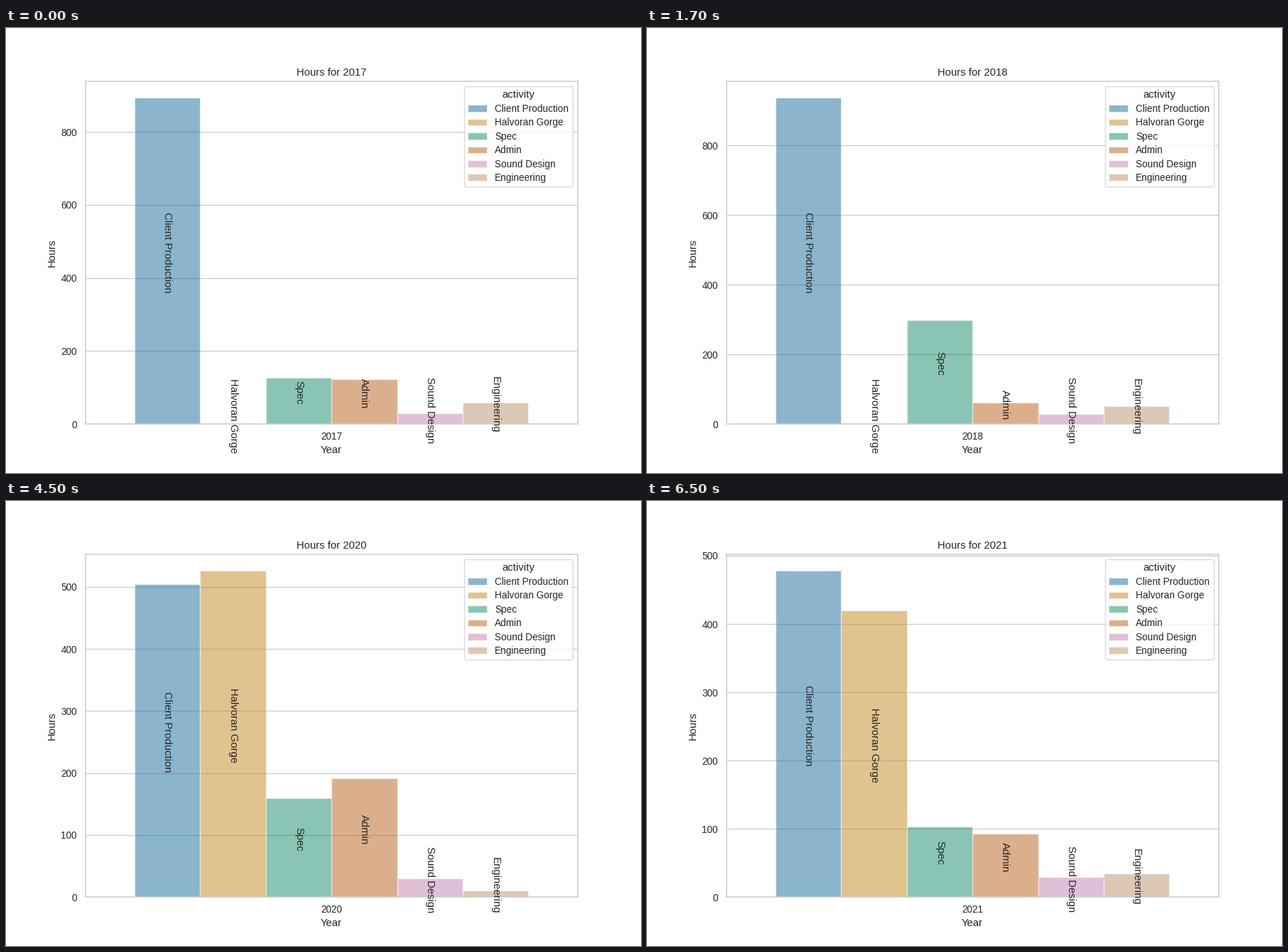
Animation, 894 px wide and 626 px high, one loop 8 s. Source, as a matplotlib script:

```python
import colorsys
import math

import matplotlib.pyplot as plt
from matplotlib.animation import FuncAnimation
from matplotlib.colors import to_rgb

INK, RULE = "0.15", "0.8"
TEXT, SMALL = 14.85, 13.6  # at 72 dpi one point is one pixel
LABEL_LIFT = 12
FIRST_YEAR = 2017


def bell(t, height, centre, width=0.4):
    return height * math.exp(-((t - centre) / width) ** 2 / 2)


# Each activity: colour and hours as a function of years since the first.
ACTIVITIES = {
    "Client Production": ("#0173b2", lambda t: 476.5 + bell(t, 499, 0.6, 1)),
    "Halvoran Gorge": ("#de8f05",
                       lambda t: max(0, bell(t, 640.7, 3.25, 1.161) - 100)),
    "Spec": ("#029e73", lambda t: 101 + bell(t, 216, 0.83) + bell(t, 58, 3)),
    "Admin": ("#d55e00",
              lambda t: 61 + bell(t, 66, -0.15) + bell(t, 143, 3.2, 0.46)),
    "Sound Design": ("#cc78bc", lambda t: 29 + bell(t, 14.5, 2)),
    "Engineering": ("#ca9161", lambda t: 58.5 - bell(t, 48.4, 2.88, 0.95)),
}
BAR_WIDTH = 0.8 / len(ACTIVITIES)

plt.rcParams.update({
    "font.family": "Liberation Sans",
    "font.size": TEXT,
    "axes.titlesize": TEXT,
    "axes.labelsize": TEXT,
    "xtick.labelsize": SMALL,
    "ytick.labelsize": SMALL,
    "legend.fontsize": SMALL,
    "legend.title_fontsize": TEXT,
    "text.color": INK,
    "axes.labelcolor": INK,
    "axes.edgecolor": RULE,
    "axes.linewidth": 1.56,
    "axes.axisbelow": True,
    "axes.titlepad": 8,
    "axes.labelpad": 5,
    "patch.linewidth": 1.25,
})


def muted(color, amount=0.75):
    hue, light, sat = colorsys.rgb_to_hls(*to_rgb(color))
    return colorsys.hls_to_rgb(hue, light, sat * amount)


fig, ax = plt.subplots(figsize=(894 / 72, 626 / 72), dpi=72)
ax.set(xlim=(-0.5, 0.5), xlabel="Year", ylabel="Hours")
ax.grid(axis="y", color=RULE, linewidth=1.25)
ax.tick_params(length=0, pad=11.9, labelcolor=INK)
ax.tick_params(axis="x", pad=11)

bars, labels = [], []
for i, (name, (color, _)) in enumerate(ACTIVITIES.items()):
    x = (i - 2.5) * BAR_WIDTH
    bars += ax.bar(x, 1, BAR_WIDTH, color=muted(color), edgecolor="white",
                   alpha=0.5, label=name)
    labels.append(ax.annotate(name, (x, 0), xytext=(0, LABEL_LIFT),
                              textcoords="offset points", rotation=270,
                              ha="center", va="center"))
ax.legend(bars, list(ACTIVITIES), title="activity", loc="upper right",
          labelspacing=0.4)


def update(frame):
    # The first year holds for one step, each later year for up to four.
    t = (frame + 3) // 4
    hours = [rule(t) for _, rule in ACTIVITIES.values()]
    for bar, label, value in zip(bars, labels, hours):
        bar.set_height(value)
        label.xy = (label.xy[0], value / 2)
    year = FIRST_YEAR + t
    ax.set_ylim(0, max(hours) * 1.05)
    ax.set_xticks([0], [str(year)])
    ax.set_title(f"Hours for {year}")
    return bars + labels


anim = FuncAnimation(fig, update, frames=16, interval=500, repeat=True)
plt.show()
```
